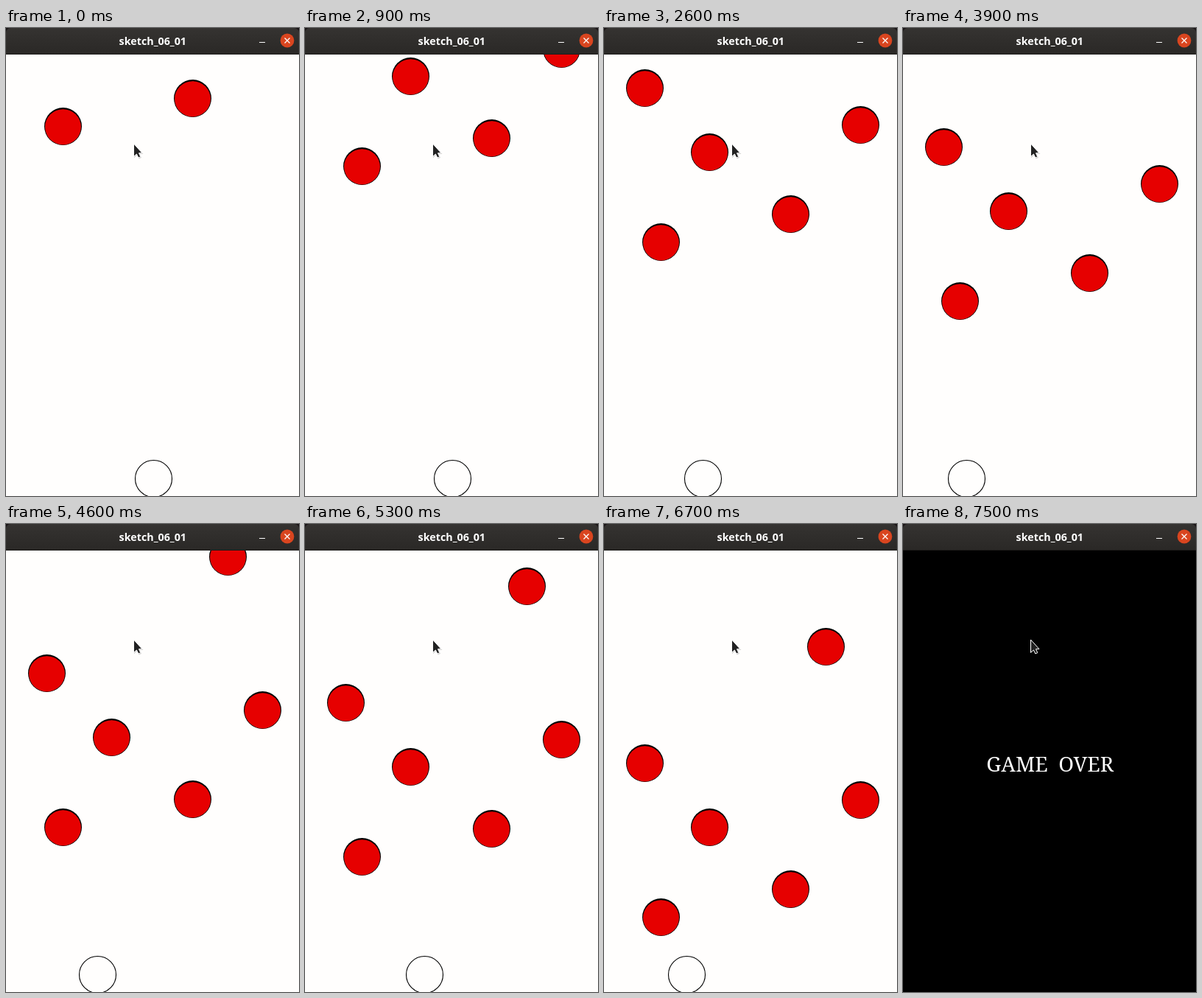
An HTML page that plays this animation: 398 px wide and 635 px high, repeating every 8000 ms.

```html
<!DOCTYPE html>
<html lang="en">
<head>
<meta charset="utf-8">
<title>sketch_06_01</title>
<style>
  html, body { margin: 0; width: 100%; height: 100%; overflow: hidden; background: #fffefd; }
  svg { display: block; width: 398px; height: 635px; }
  .title { font: bold 14.3px "Open Sans", "Noto Sans", sans-serif; fill: #fff; text-anchor: middle; }
  .over { font: 28px "Noto Serif", serif; fill: #fff; text-anchor: middle; white-space: pre; }
</style>
</head>
<body>
<svg viewBox="0 0 398 635">
  <defs>
    <linearGradient id="bar" x1="0" y1="0" x2="0" y2="1">
      <stop offset="0" stop-color="#353331"/>
      <stop offset="1" stop-color="#2a2826"/>
    </linearGradient>
    <g id="ball">
      <circle r="25.5"/>
      <ellipse cy=".8" rx="24.4" ry="24.1" fill="#e60000"/>
    </g>
  </defs>

  <g id="game">
    <rect width="398" height="635" fill="#fffefd"/>
    <g id="balls"></g>
    <circle id="player" cy="611.5" r="25" fill="#fffefd" stroke="#000" stroke-width="1.1"/>
  </g>

  <g id="over">
    <rect width="398" height="635"/>
    <text class="over" x="199.7" y="336">GAME  OVER</text>
  </g>

  <rect width="398" height="36" fill="#171214"/>
  <path d="M0 36V7Q0 0 7 0H391Q398 0 398 7V36Z" fill="url(#bar)"/>
  <path d="M0 35.5H398" stroke="#1d1b1a"/>
  <text class="title" x="199.3" y="23">sketch_06_01</text>
  <path d="M344 19.5H352" stroke="#fff"/>
  <circle cx="382" cy="17" r="9.4" fill="#d9451f"/>
  <path d="M378.5 13.5L385.5 20.5M385.5 13.5L378.5 20.5" stroke="#fff" stroke-width="1.3"/>

  <g stroke-linejoin="round">
    <path id="shade" d="M174 158V176L178 172.5L180.5 177.5L184 176L181.5 171H186.5Z" fill="#000" opacity=".18"/>
    <path d="M173.5 157V174.5L177.4 171L179.8 176L182.8 174.7L180.5 169.7H185Z" fill="#222" stroke="#fff"/>
  </g>
</svg>
<script>
  const LOOP = 8000, STEP = 100, END = 7500;

  // [ms, position], linear in between
  const fall = [[0, 133], [1700, 235], [2600, 290], [3900, 370], [5300, 451], [6700, 533], [7300, 570]];
  const steer = [[1600, 200], [1700, 194], [2600, 134], [3900, 86], [5300, 162], [6700, 112], [7200, 100]];

  // [x, height above the lowest ball]
  const drops = [[77.5, 0], [253.5, 38], [143.5, 122], [348.5, 159], [55.5, 209], [301.5, 367], [190.5, 535]];

  const $ = id => document.getElementById(id);

  const balls = drops.map(() => {
    const use = document.createElementNS("http://www.w3.org/2000/svg", "use");
    use.setAttribute("href", "#ball");
    return $("balls").appendChild(use);
  });

  // Value of a track at time t, on a pixel centre
  function at(track, t) {
    const i = track.findIndex(key => key[0] > t);
    if (i === 0) return track[0][1] + 0.5;
    if (i < 0) return track[track.length - 1][1] + 0.5;
    const [t0, a] = track[i - 1], [t1, b] = track[i];
    return Math.round(a + (b - a) * (t - t0) / (t1 - t0)) + 0.5;
  }

  const show = (el, on) => el.setAttribute("visibility", on ? "visible" : "hidden");

  function draw(time) {
    const t = Math.floor(time % LOOP / STEP) * STEP;
    const over = t >= END;
    $("game").style.display = over ? "none" : "";
    $("over").style.display = over ? "" : "none";
    show($("shade"), !over);

    const low = at(fall, t);
    drops.forEach(([x, lift], i) => {
      const y = low - lift;
      balls[i].setAttribute("transform", `translate(${x} ${y})`);
      show(balls[i], y > 12);
    });
    $("player").setAttribute("cx", at(steer, t));
  }

  const start = performance.now();
  function tick() {
    draw(performance.now() - start);
    requestAnimationFrame(tick);
  }
  tick();
</script>
</body>
</html>
```
